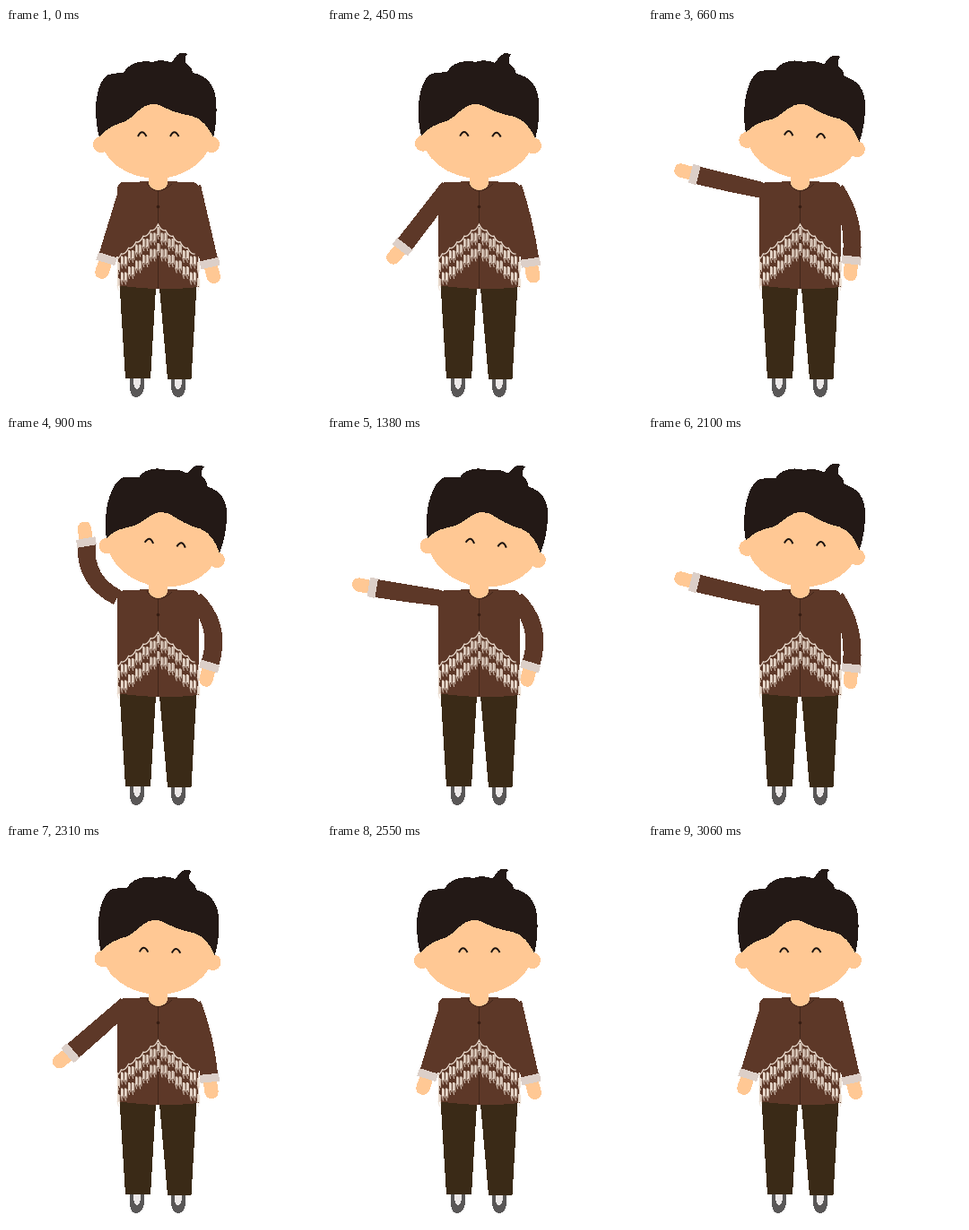
These frames come from a looping animation (351 px wide and 424 px high, 3390 ms). An HTML page:

```html
<!DOCTYPE html>
<html lang="en">
<head>
<meta charset="utf-8">
<title>Waving boy</title>
<style>
  html, body { margin: 0; width: 100%; height: 100%; overflow: hidden; background: #fff; }
  svg { display: block; width: 100vw; height: 100vh; }
  .skin { fill: #ffc894; }
  .cloth { fill: #5d3828; }
  .cuff { fill: #dccfc8; }
  .hair { fill: #231916; }
  .trousers { fill: #3a2a17; }
  .shoe { fill: #595757; }
  .sock { fill: #ebe8e8; }
  .seam { fill: none; stroke: #41261a; stroke-width: 1; }
  .motif { fill: none; stroke: #eadccf; }
</style>
</head>
<body>
<svg viewBox="0 0 351 424" shape-rendering="crispEdges">
  <g id="shoes">
    <path class="shoe" d="M137.500 390V399C138 407 140 412 145 412C151 412 154 406 154 398V390Z"/>
    <path class="sock" d="M142 390H150V396C149 401 148 403 146 403C143 403 142 399 142 390Z"/>
    <path class="shoe" d="M183.500 390V398C184 406 187 412 192 412C197 412 200 407 200 399V390Z"/>
    <path class="sock" d="M188 390H196C196 399 195 403 192 403C190 403 188 401 188 396Z"/>
  </g>
  <path class="trousers" d="M126.500 286L133 391H161L167 290ZM171 290L180 391.500H206.500L212.500 286Z"/>

  <g id="leftArm"></g>
  <g id="rightArm"></g>

  <path class="cloth" d="M123.600 181Q124 173 130 172.500L158 171H181L210 172.500Q215 174 215 181V289Q170 294 123.600 287Z"/>
  <path class="skin" d="M159 160H180V174C178 179 174 181 169.500 181C165 181 161 179 159 174Z"/>
  <g shape-rendering="auto">
    <path class="seam" d="M157 173C161 179 165 181.500 169.500 181.500C174 181.500 180 179 185 174M169.500 182V291"/>
    <circle cx="169.500" cy="199.500" r="1.800" fill="#351d13"/>
    <g id="motif" class="motif"></g>
  </g>

  <g id="head">
    <circle class="skin" cx="106" cy="130" r="9"/>
    <circle class="skin" cx="229" cy="130" r="9"/>
    <path class="skin" d="M103 112C103 150 138 168 168 168C198 168 230 148 232 114L215 95L165 80L120 100Z"/>
    <path class="hair" d="M104 122C101 112 100 101 100 88C101 72 105 57 114 52Q123 50 131 50C135 41 147 35 163 38
      Q173 34 184 38.500C187 36 189 30 194 28Q199 27 202 29C199 32 199 36 201 40Q207 43 208 50C223 53 232 62 234 80
      Q236 103 231 122C226 111 218 101 207 98C192 96 181 91 173 87Q164 83 155 87C146 92 141 100 133 104
      C121 108 111 112 104 122Z"/>
    <path shape-rendering="auto" fill="none" stroke="#1b1310" stroke-width="2"
      d="M147 121Q151.500 111.500 156.500 121M183 121Q187.500 111.500 192.500 121"/>
  </g>
</svg>
<script>
const LOOP = 3390, STEP = 30;
const WAVE = [[300, 0], [900, 1], [1350, .61], [1800, 1], [2550, 0]];
const LEAN = [[300, 0], [900, 1], [1800, 1], [2550, 0]];

const byId = id => document.getElementById(id);
const clamp = u => Math.min(1, Math.max(0, u));
const smooth = u => (u = clamp(u), u * u * (3 - 2 * u));
const mix = (a, b, u) => a + (b - a) * u;

function track(keys, t) {
  let [t0, value] = keys[0];
  for (const [t1, next] of keys.slice(1)) {
    if (t <= t0) break;
    value = mix(value, next, smooth((t - t0) / (t1 - t0)));
    if (t < t1) break;
    t0 = t1;
  }
  return value;
}

// The sleeve hangs from its outer shoulder corner, curving away by one angle and back by another.
function armMarkup(angle, length, shoulderBend, cuffBend) {
  const a = shoulderBend * Math.PI / 180, b = cuffBend * Math.PI / 180;
  const half = length / 2, bulge = half * Math.tan(a);
  return `<g transform="rotate(${angle})">
    <path class="cloth" d="M0 0Q${bulge} ${half} 0 ${length}l${20 * Math.cos(b)} ${20 * Math.sin(b)}
      Q${bulge + 20 / Math.cos(b)} ${half} ${18 * Math.cos(a)} ${-18 * Math.sin(a)}Z"/>
    <g transform="translate(0 ${length}) rotate(${cuffBend})">
      <path class="skin" d="M2 7L1.500 20C2 26 5 27.500 9 27.500C14 27.500 17.500 24 17 17V7Z"/>
      <path class="cuff" d="M-1 0H21L20.500 9H-1Z"/>
    </g></g>`;
}

function motifMarkup() {
  const cx = 169.5, slope = .8, pitch = 8.2;
  const ridge = x => 219 + slope * Math.abs(x - cx);
  let scallops = `M124 ${ridge(124)}`, bars = "", tails = "";
  for (let i = -5; i <= 5; i++) {
    const x = cx + pitch * i, mid = x - pitch / 2;
    scallops += `Q${mid} ${ridge(mid) + 5} ${x} ${ridge(x)}`;
  }
  for (let i = -11; i <= 11; i++) {
    const x = cx + 4.05 * i, stair = 2 * Math.round(Math.abs(i) / 2);
    for (const base of [222, 240]) {
      const y = base + slope * 4.05 * stair;
      bars += `M${x} ${y}v9`;
      tails += `M${x - 1} ${y + 8}l1.500 6M${x + 1.6} ${y + 1}v10`;
    }
  }
  return `<path stroke-width="1.300" d="${scallops}"/>
    <path stroke-width="2" d="${bars}"/>
    <path stroke-width=".9" d="${tails}M124.500 255V286M214.500 255V286"/>`;
}

function draw(t) {
  const wave = track(WAVE, t), lean = track(LEAN, t);
  const curl = smooth((wave - .65) / .35);
  byId("leftArm").innerHTML = armMarkup(17 + 134 * wave, 82 - 16 * wave - 8 * curl, 34 * curl, 19 * curl);
  byId("rightArm").innerHTML = armMarkup(mix(13, 14.2, lean), 83, -31 * lean, -31 * lean);
  byId("head").setAttribute("transform", `rotate(${7.4 * lean} 168 179)`);
}

byId("leftArm").setAttribute("transform", "translate(128 172)");
byId("rightArm").setAttribute("transform", "translate(217 175) scale(-1 1)");
byId("motif").innerHTML = motifMarkup();

const start = performance.now();
function tick() {
  const t = (performance.now() - start) % LOOP;
  draw(Math.floor(t / STEP) * STEP);
  requestAnimationFrame(tick);
}
tick();
</script>
</body>
</html>
```
